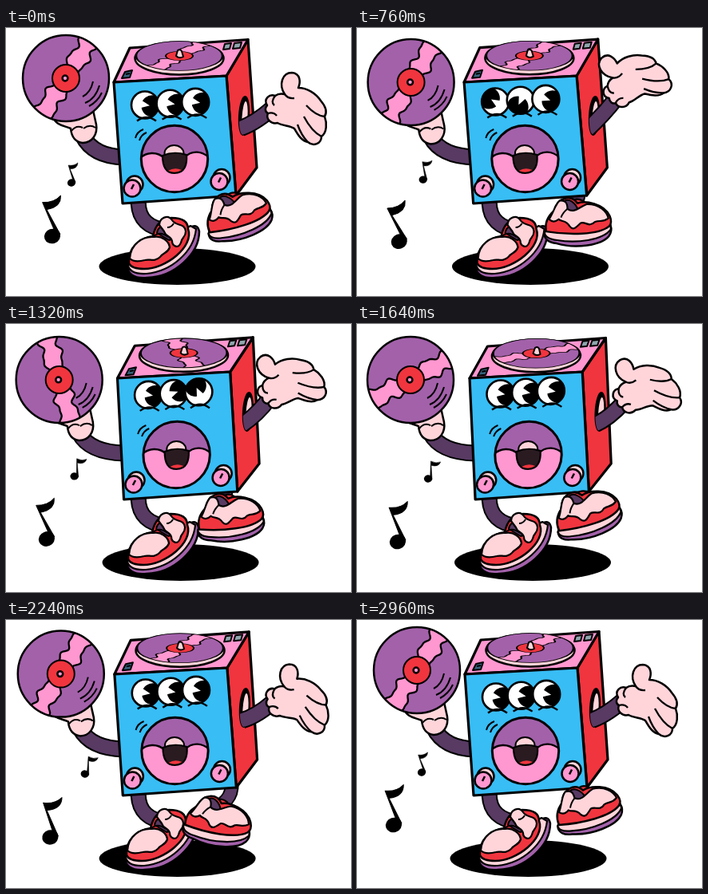
Write an HTML page with a canvas that moves like this. It is 432 by 336 pixels and loops after 3 s.

```html
<!DOCTYPE html>
<html lang="en">
<head>
<meta charset="utf-8">
<title>Dancing turntable</title>
<style>
html, body { margin: 0; width: 100%; height: 100%; overflow: hidden; background: #fff; }
canvas { display: block; width: 432px; height: 336px; }
</style>
</head>
<body>
<canvas id="stage" width="432" height="336"></canvas>
<script>
const ctx = document.getElementById('stage').getContext('2d');
const LOOP = 3000, STEP = 40, TAU = Math.PI * 2, DEG = Math.PI / 180;
const BLUE = '#38bdf5', RED = '#f0353f', PINK = '#ff97d0', CREAM = '#ffd5da',
  PURPLE = '#a361aa', DARK = '#583a63', MOUTH = '#2a1b21', BLACK = '#000', WHITE = '#fff';

// Smooth periodic curve through key poses
const TIMES = [0, 480, 1040, 1640, 1960, 2520, 2960];
function curve(...v) {
  const n = v.length;
  const at = i => TIMES[(i + n) % n] + Math.floor(i / n) * LOOP;
  const val = i => v[(i + n) % n];
  const slope = i => (val(i + 1) - val(i - 1)) / (at(i + 1) - at(i - 1));
  return t => {
    let i = n - 1;
    while (TIMES[i] > t) i--;
    const h = at(i + 1) - at(i), u = (t - at(i)) / h, u2 = u * u, u3 = u2 * u;
    return (2 * u3 - 3 * u2 + 1) * val(i) + (u3 - 2 * u2 + u) * h * slope(i) +
      (3 * u2 - 2 * u3) * val(i + 1) + (u3 - u2) * h * slope(i + 1);
  };
}

const pose = {
  sway: curve(0, -3, 2, 6, 1, 1.3, 0),
  eyeY: curve(0, -2, -6, -9, -9, -1, 0),
  discX: curve(75, 69.5, 66.5, 67, 65, 73, 75),
  discY: curve(63, 66, 69.5, 70, 70, 65, 63),
  wristX: curve(330, 322, 323, 331, 331, 331, 330),
  wristY: curve(102, 90, 91, 99, 102, 105, 102),
  handRot: curve(0, -45, -43, -33, -15, 1, 0),
  shoeX: curve(290, 282, 273, 288, 272, 264, 288.5),
  shoeY: curve(235, 239, 247, 238, 247, 256, 237),
  shoeRot: curve(-20, -13, 0, -20, 1, 6, -18),
  standX: curve(0, -3, -3, 1, -3, -2, 0),
  shadowX: curve(214.5, 217, 217, 220, 217, 213, 214.5),
  noteX: curve(58, 54, 52, 51, 57, 52, 46),
  noteY: curve(261, 269, 266, 273, 265, 278, 257),
  noteRot: curve(3, 0, 0, 5, 11, 4, 5),
  miniX: curve(82, 82, 84, 89, 99, 95, 81),
  miniY: curve(194, 192, 189, 194, 195, 191, 191),
  miniRot: curve(9, 9, 25, 28, 32, 26, 8)
};

function shape(d, fill, width = 2.5) {
  const p = new Path2D(d);
  if (fill) { ctx.fillStyle = fill; ctx.fill(p); }
  if (width) { ctx.lineWidth = width; ctx.strokeStyle = BLACK; ctx.stroke(p); }
}
function oval(x, y, rx, ry, fill, width = 2.5, rot = 0) {
  ctx.beginPath();
  ctx.ellipse(x, y, rx, ry, rot, 0, TAU);
  if (fill) { ctx.fillStyle = fill; ctx.fill(); }
  if (width) { ctx.lineWidth = width; ctx.strokeStyle = BLACK; ctx.stroke(); }
}
function poly(points, fill) {
  shape('M' + points.map(p => p.join(' ')).join('L') + 'Z', fill, 3.2);
}
function limb(d, width) {
  const p = new Path2D(d);
  for (const [w, c] of [[width + 4, BLACK], [width, DARK]]) {
    ctx.lineWidth = w; ctx.strokeStyle = c; ctx.stroke(p);
  }
}
function place(x, y, deg, scale, draw) {
  ctx.save();
  ctx.translate(x, y);
  ctx.rotate(deg * DEG);
  ctx.scale(scale, scale);
  draw();
  ctx.restore();
}

function note(x, y, deg, scale) {
  place(x, y, deg, scale, () => {
    oval(0, 0, 10.5, 9.5, BLACK, 0, -0.4);
    shape('M5-2L-15-43Q0-43 8-53Q10-38-9-34L10-3Z', BLACK, 1);
  });
}

// Disc with a wavy coloured band
function disc(r, deg, flat, label) {
  ctx.save();
  ctx.scale(1, flat);
  oval(0, 0, r, r, PURPLE, 0);
  ctx.save();
  ctx.clip();
  ctx.rotate(deg * DEG);
  ctx.beginPath();
  const wave = x => 2.4 * Math.sin(x * 13 / r) + 1.3 * Math.sin(x * 23 / r + 1);
  for (let x = -r - 3; x <= r + 3; x += 2) ctx.lineTo(x, wave(x) - r * 0.2);
  for (let x = r + 3; x >= -r - 3; x -= 2) ctx.lineTo(x, wave(x + 7) + r * 0.2);
  ctx.closePath();
  ctx.fillStyle = PINK;
  ctx.fill();
  ctx.lineWidth = 2.3;
  ctx.strokeStyle = BLACK;
  ctx.stroke();
  ctx.restore();
  oval(0, 0, label, label, RED, 2);
  oval(0, 0, r, r, null, 2.5);
  ctx.restore();
}

// The hand follows the disc it carries at a smaller scale
function leftArm(discX, discY) {
  const x = 75 + (discX - 75) * 0.5, y = 63 + (discY - 63) * 0.3;
  limb(`M${x + 21} ${y + 72}Q${x + 34} 161 148 162`, 17);
  place(x, y, 0, 1, () => {
    shape('M-17 47C-12 60-3 59 6 63C7 73 12 80 21 81C33 81 40 70 38 58L34 40Z', CREAM);
    shape('M7 66Q13 58 21 62M22 63Q30 57 37 62', null, 2);
  });
}
function heldDisc(x, y, deg) {
  place(x, y, 0, 1, () => {
    disc(54, deg, 1, 17);
    oval(-1, 0, 3.4, 3.4, PINK, 2.5);
    shape('M24 31Q37 26 42 9M29 35Q40 29 45 18M21 23Q31 18 34 4', null, 2);
  });
}

function rightArm(x, y, rot, s) {
  const hx = 298 + s * 1.1;
  oval(hx, 110, 6, 24, BLACK, 2, 0.06);
  oval(hx + 1, 112, 3.5, 20, CREAM, 0, 0.06);
  ctx.save();
  ctx.beginPath();
  ctx.rect(hx, 0, 200, 336);
  ctx.ellipse(hx, 110, 6, 24, 0.06, 0, TAU);
  ctx.clip();
  limb(`M${hx - 8} 127Q${hx + 12} ${y + 19} ${x + 3} ${y - 1}`, 17);
  ctx.restore();
  place(x, y, rot, 1, () => {
    shape('M-3-5C-8-13 0-20 7-17C11-20 15-20 19-19C11-31 16-46 28-46' +
      'C39-45 39-34 36-27C47-27 58-20 64-11C71-3 72 4 69 9C72 17 72 29 65 34' +
      'C65 43 55 47 48 41C40 40 35 31 31 24C25 20 17 21 10 17C2 19-5 12-2 5C-6 3-6-2-3-5Z', CREAM);
    shape('M69 9Q58 8 46-5M65 34Q53 28 43 9M48 41Q40 33 35 19' +
      'M19-19Q23-13 31-14M7-17Q1-9 6-5M-2 5Q5 3 9 8', null, 2.3);
  });
}

function shoe(x, y, rot) {
  place(x, y, rot, 1, () => {
    shape('M-9-20C-8-32 10-33 13-19L4-12Z', RED, 2.2);
    shape('M-42 9C-44 17-38 22-28 24C-5 33 28 31 38 20Q43 14 41 7L-36 2Z', PURPLE);
    shape('M-42 9C-42 14-37 18-27 20C-4 26 30 25 41 12L41 4L-36 1Z', CREAM, 2.2);
    shape('M-40 8C-41-4-35-12-28-17C-22-34-5-36 2-24C12-27 35-21 41-5Q44 4 39 8' +
      'C25 18-12 15-40 8Z', RED);
    shape('M-20-15C-20-27-12-32-5-27Q1-22 2-15L-8-8Z', DARK, 2);
    shape('M-35-7C-28-16-26-25-20-29Q-10-30-11-18C-3-11 5-20 14-22' +
      'C29-21 38-11 39-2C31 3 29-1 22 1C14 8 10-1 4 1C-2 6-6 10-10 4C-14-5-20-2-23-6Q-30-1-35-7Z', CREAM, 2.2);
    shape('M-11-18Q-17-14-20-8', null, 2);
  });
}

function standingShoe(dx) {
  place(dx, 0, 0, 1, () => {
    shape('M154 297C150 307 160 315 177 313C211 312 242 283 242 255Q240 246 233 249Z', PURPLE);
    shape('M153 295C152 304 161 309 176 308C207 305 235 281 238 252L231 248Z', CREAM, 2.2);
    shape('M154 295C152 275 169 263 184 261C187 246 195 239 207 238C221 238 228 243 228 252' +
      'C236 274 200 302 173 302Q157 302 154 295Z', RED);
    shape('M189 257C190 248 200 245 209 248L219 261L204 266Z', DARK, 2);
    shape('M155 289C156 271 171 261 185 262C195 260 204 267 205 275' +
      'C202 283 197 281 193 287C186 294 180 289 174 291C166 293 159 293 155 289Z', CREAM, 2.2);
    shape('M192 247C192 238 203 233 208 241C213 249 224 244 225 255' +
      'C225 263 220 262 219 269C216 278 208 273 208 267C206 260 200 262 198 255Z', CREAM, 2.2);
    shape('M202 250Q207 250 210 245M185 261Q193 254 203 262', null, 2);
  });
}

function eye(x, y, deg) {
  oval(x, y, 17, 17, WHITE, 0);
  ctx.save();
  ctx.clip();
  ctx.translate(x, y);
  ctx.rotate(deg * DEG);
  oval(9, 0, 13.5, 13.5, BLACK, 0);
  shape('M6 0L-9-7L-9 6Z', WHITE, 0);
  ctx.restore();
  oval(x, y, 17, 17, null, 2.6);
  shape(`M${x - 10} ${y + 20}Q${x + 2} ${y + 11} ${x + 14} ${y + 20}`, null, 2.3);
}

function knob(x, y) {
  oval(x + 3, y - 4, 10.5, 10.5, CREAM);
  oval(x, y + 1, 10.5, 10.5, PINK);
  shape(`M${x - 1} ${y + 2}L${x + 2} ${y - 4}`, null, 2.5);
}

function speaker() {
  oval(211, 164, 41.7, 41.7, PURPLE, 0);
  ctx.save();
  ctx.clip();
  shape('M165 166C175 154 190 155 198 163L224 162C232 153 246 153 257 165L257 210L165 210Z', PINK, 2.3);
  ctx.restore();
  oval(211, 164, 41.7, 41.7, null, 3);
  oval(210.5, 157, 12, 10, CREAM, 2);
  shape('M196 160Q210 154 226 159C227 171 224 182 211 182C199 182 196 172 196 160Z', MOUTH, 2.2);
  shape('M203 179Q211 174 220 178Q212 183 203 179Z', RED, 0);
}

function box(s, t, spin) {
  const f = (x, y) => [x + s * (0.35 + 0.65 * (220 - y) / 152), y];
  const b = (x, y) => [x + s * 1.4, y + s * 0.5];
  const tl = f(135, 68), tr = f(276, 60), br = f(288, 210), bl = f(146, 220);
  const backL = b(155, 25), backR = b(303, 14.5);
  poly([tr, backR, [314 + s * 0.7, 175], br], RED);
  poly([tl, backL, backR, tr], PINK);
  poly([tl, tr, br, bl], BLUE);

  // Deck
  ctx.save();
  ctx.transform(1, 0, -0.4 * s / 44, 1, s * (1 + 0.4 * 64 / 44), s * 0.3);
  oval(217, 38, 55.5, 20.5, CREAM);
  ctx.translate(217, 35);
  disc(54, spin, 0.34, 17);
  shape('M-4 0L-2-7Q1-9 3-6L5 1Q0 4-4 0Z', CREAM, 2);
  ctx.translate(-217, -35);
  shape('M274 20L282 19L280 26L272 27Z', '#8fa5ad', 2);
  shape('M286 19L295 18L293 25L284 26Z', '#8fa5ad', 2);
  shape('M149 55L158 53L155 62L145 63Z', '#34617d', 2);
  shape('M150 58L155 57', null, 2);
  ctx.restore();

  // Front panel
  ctx.save();
  ctx.transform(1, 0, -0.65 * s / 152, 1, s * (0.35 + 0.65 * 220 / 152), 0);
  speaker();
  knob(158, 200);
  knob(267, 191.5);
  shape('M162 138Q164 130 172 127M167 141Q169 134 176 131', null, 2);
  const ey = pose.eyeY(t);
  for (let i = 0; i < 3; i++) {
    const roll = Math.min(1, Math.max(0, (t - 255 - 240 * i) / 900));
    eye(174 + 31.6 * i, 96.5 - 1.8 * i + ey, 8 + 360 * roll);
  }
  ctx.restore();
}

function draw(t) {
  const p = {};
  for (const k in pose) p[k] = pose[k](t);
  const u = t / (LOOP - STEP), spin = 123 + 720 * u - 10 * Math.sin(Math.PI * u);
  ctx.fillStyle = WHITE;
  ctx.fillRect(0, 0, 432, 336);
  ctx.lineJoin = 'round';
  ctx.lineCap = 'butt';

  oval(p.shadowX, 299, 98, 23, BLACK, 0);
  note(p.noteX, p.noteY, p.noteRot, 0.97);
  note(p.miniX, p.miniY, p.miniRot, 0.49);
  leftArm(p.discX, p.discY);
  heldDisc(p.discX, p.discY, spin);

  limb('M166 212Q163 245 193 252', 16);
  const hip = 270 + (290 - p.shoeX) * 0.5, ax = p.shoeX - 12, ay = p.shoeY - 19;
  limb(`M${hip} 204Q${hip + 2} ${ay - 5} ${ax} ${ay + 4}`, 14);
  box(p.sway, t, spin);
  rightArm(p.wristX, p.wristY, p.handRot, p.sway);
  standingShoe(p.standX);
  shoe(p.shoeX, p.shoeY, p.shoeRot);
}

function tick() {
  const t = performance.now() % LOOP;
  draw(Math.floor(t / STEP) * STEP);
  requestAnimationFrame(tick);
}
tick();
</script>
</body>
</html>
```
